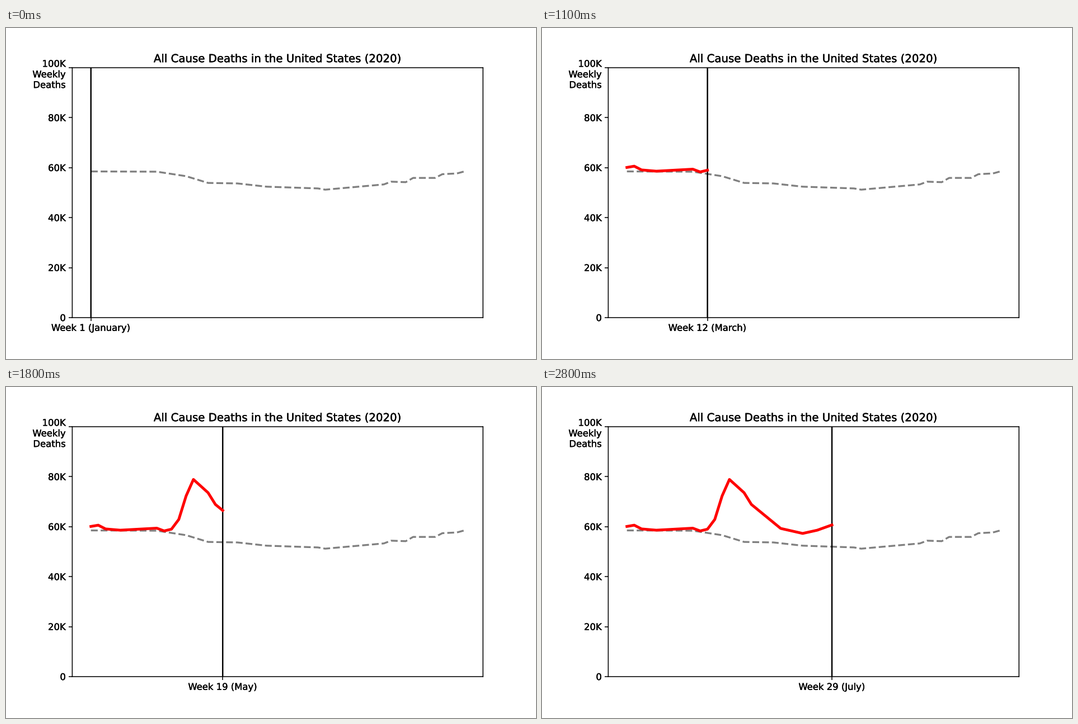
A matplotlib script for the animation above (3.9 s loop, 947 by 592 pixels).

```python
import matplotlib.pyplot as plt
import numpy as np
from matplotlib.animation import FuncAnimation
from matplotlib.patheffects import withStroke

WIDTH, HEIGHT, DPI = 947, 592, 947 / 8
FRAMES, INTERVAL = 39, 100
LAST_WEEK, STOP_WEEK = 52, 29

# Turning points of each curve: (week, thousands of deaths)
EXPECTED_KEYS = [(1, 58.5), (10, 58.4), (14, 56.6), (17, 53.9), (21, 53.7), (25, 52.4),
                 (32, 51.7), (33, 51.2), (41, 53.3), (42, 54.4), (44, 54.2), (45, 55.9),
                 (48, 55.9), (49, 57.4), (51, 57.7), (52, 58.5)]
OBSERVED_KEYS = [(1, 60.1), (2, 60.6), (3, 59.1), (5, 58.6), (10, 59.4), (11, 58.3),
                 (12, 59.0), (13, 62.9), (14, 72.3), (15, 78.9), (17, 73.6), (18, 68.9),
                 (20, 64.1), (22, 59.3), (25, 57.3), (27, 58.6), (29, 60.7)]
MONTHS = ["January", "February", "March", "April", "May", "June", "July"]
MONTH_ENDS = np.cumsum([31, 29, 31, 30, 31, 30, 31])

plt.rcParams.update({"font.family": "DejaVu Sans", "text.hinting": "none",
                     "path.snap": False, "axes.linewidth": 0.95,
                     "xtick.major.width": 0.95, "ytick.major.width": 0.95})


def curve(keys, weeks):
    return np.interp(weeks, *zip(*keys))


def week_label(week):
    # Weeks end on Saturdays, the first one on January 4
    saturday = 4 + 7 * (week - 1)
    return f"Week {week} ({MONTHS[np.searchsorted(MONTH_ENDS, saturday)]})"


weeks = np.arange(1, LAST_WEEK + 1)
observed = curve(OBSERVED_KEYS, weeks[:STOP_WEEK])

fig = plt.figure(figsize=(WIDTH / DPI, HEIGHT / DPI), dpi=DPI, facecolor="white")
ax = fig.add_axes([0.125, 0.125, 0.775, 0.755])
title = ax.set_title("All Cause Deaths in the United States (2020)", fontsize=12)
margin = 0.05 * (LAST_WEEK - 1)
ax.set_xlim(1 - margin, LAST_WEEK + margin)
ax.set_ylim(0, 100)
ax.set_xticks([1], [week_label(1)])
ax.set_yticks(range(0, 101, 20),
              ["0", "20K", "40K", "60K", "80K", "\n100K\nWeekly\nDeaths"])
for text in [title, *ax.get_xticklabels(), *ax.get_yticklabels()]:
    text.set_path_effects([withStroke(linewidth=0.25, foreground="black")])
    text.set_linespacing(1.28)

ax.plot(weeks, curve(EXPECTED_KEYS, weeks), "--", color="gray", lw=2)
week_line = ax.axvline(1, color="black", lw=1.5)
observed_line, = ax.plot([], [], color="red", lw=3)


def update(frame):
    week = min(frame + 1, STOP_WEEK)
    observed_line.set_data(weeks[:week], observed[:week])
    week_line.set_xdata([week, week])
    ax.set_xticks([week], [week_label(week)])
    return observed_line, week_line


animation = FuncAnimation(fig, update, frames=FRAMES, interval=INTERVAL,
                          init_func=lambda: update(0), repeat=True, repeat_delay=0)
plt.show()
```
